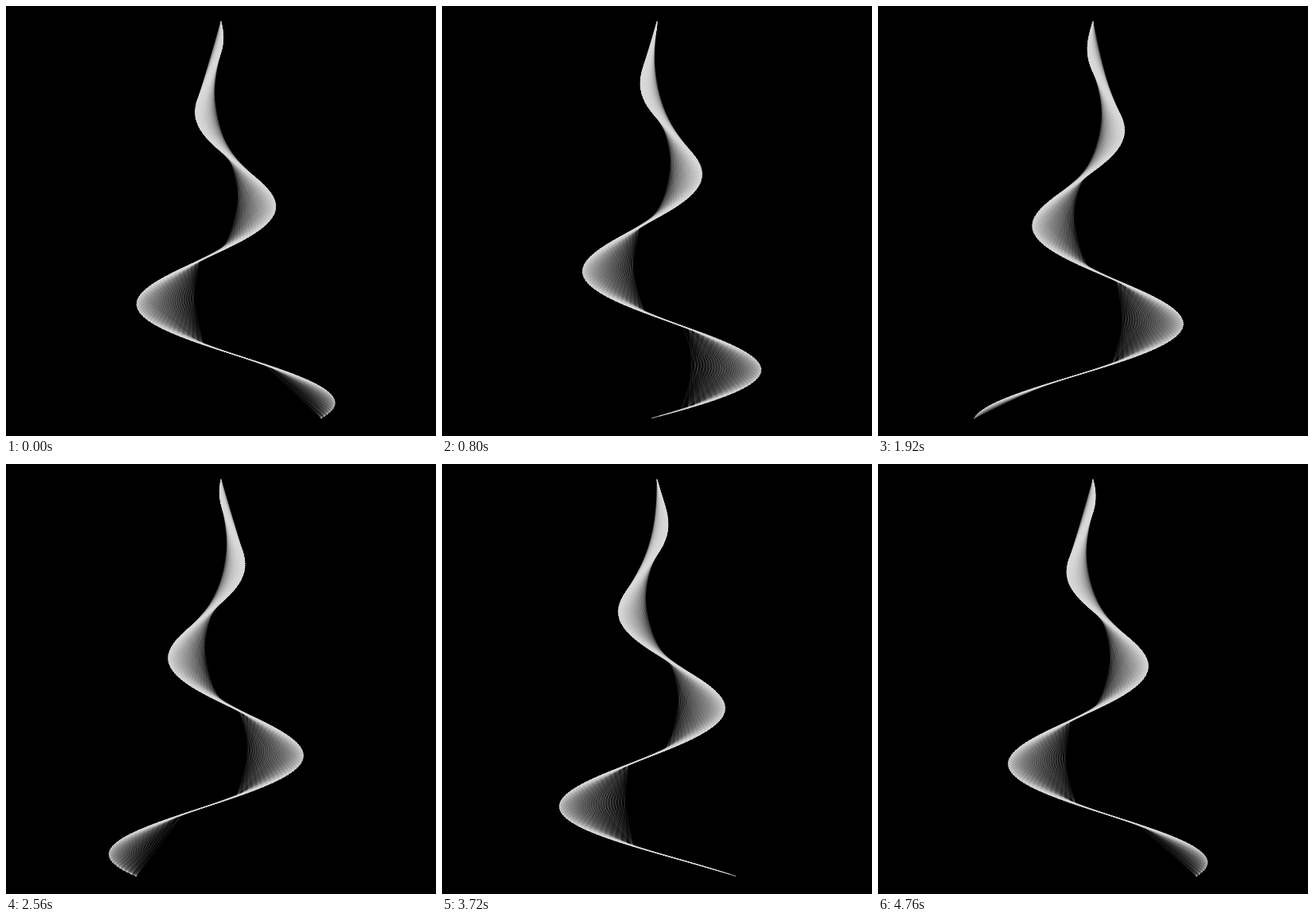
Write an HTML page with a canvas that moves like this. It is 540 px wide and 540 px high and loops after 4800 ms.

```html
<!DOCTYPE html>
<html lang="en">
<head>
<meta charset="utf-8">
<title>Cone of threads</title>
<style>
html, body { margin: 0; width: 100%; height: 100%; overflow: hidden; background: #000; }
canvas { display: block; }
</style>
</head>
<body>
<canvas id="stage" width="540" height="540"></canvas>
<script>
const ctx = document.getElementById('stage').getContext('2d');
const LOOP = 4800, STEP = 40;
const COUNT = 200, GAP = 2.5, REACH = 100;
const TURNS = 2, START = 0.35;
const TAU = Math.PI * 2;

// Points on a cone-shaped helix seen from the side.
function helix(progress) {
  return Array.from({ length: COUNT }, (_, i) => ({
    x: 270 + 0.75 * i * Math.sin(TAU * (TURNS * i / COUNT + START + progress)),
    y: 20 + GAP * i
  }));
}

// Every pair of points closer than REACH is joined by a faint line.
function draw(progress) {
  const pts = helix(progress);
  ctx.fillStyle = '#000';
  ctx.fillRect(0, 0, 540, 540);
  ctx.strokeStyle = 'rgba(217,217,217,.11)';
  ctx.lineWidth = 1;
  ctx.lineCap = 'square';
  for (let i = 0; i < COUNT; i++) {
    const a = pts[i];
    for (let j = i + 1; j < COUNT && pts[j].y - a.y < REACH; j++) {
      const b = pts[j];
      if (Math.hypot(b.x - a.x, b.y - a.y) >= REACH) continue;
      ctx.beginPath();
      ctx.moveTo(a.x, a.y);
      ctx.lineTo(b.x, b.y);
      ctx.stroke();
    }
  }
}

let last = -1;
function tick() {
  const step = Math.floor((performance.now() % LOOP) / STEP);
  if (step !== last) draw(step * STEP / LOOP);
  last = step;
  requestAnimationFrame(tick);
}
tick();
</script>
</body>
</html>
```
